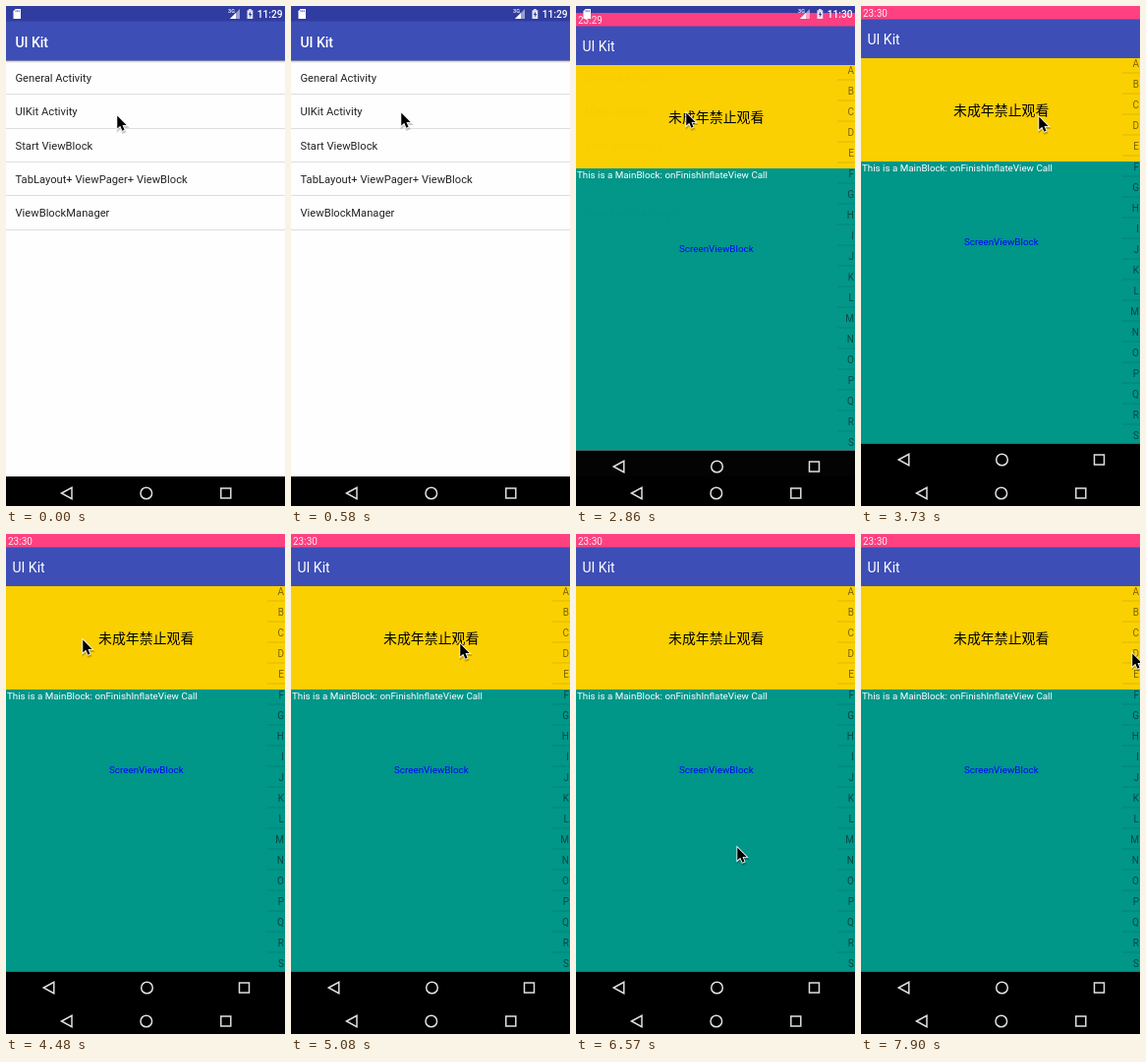
These frames come from a looping animation (284x508 px, 8 s). An HTML page:

```html
<!DOCTYPE html>
<html lang="en">
<head>
<meta charset="utf-8">
<title>UI Kit</title>
<style>
  html, body { margin: 0; width: 100%; height: 100%; overflow: hidden; background: #000; }
  svg { display: block; width: 284px; height: 508px; font-family: Roboto, sans-serif; }
  .cjk { font-family: "Noto Sans CJK SC", "Noto Sans CJK", sans-serif; }
</style>
</head>
<body>
<svg id="stage" viewBox="0 0 284 508">
  <defs>
    <linearGradient id="shade" x2="0" y2="1">
      <stop stop-color="#000" stop-opacity=".28"/>
      <stop offset="1" stop-color="#000" stop-opacity="0"/>
    </linearGradient>
  </defs>

  <g id="list">
    <rect width="284" height="478" fill="#fefefe"/>
    <rect width="284" height="16" fill="#303c9f"/>
    <rect y="15.5" width="284" height="40" fill="#3d4eb6"/>
    <rect y="55" width="284" height="3" fill="url(#shade)"/>
    <text x="9.4" y="41.7" font-size="14" font-weight="500" fill="#fff">UI Kit</text>
    <circle id="ripple" cx="117" cy="108" r="11" fill="#000" opacity=".06"/>
    <g id="rows" font-size="11.2" fill="#222"></g>
  </g>

  <g id="main">
    <rect width="284" height="14" fill="#ff4081"/>
    <text id="innerClock" x="2" y="10.7" font-size="10" fill="#fff" fill-opacity=".9"></text>
    <rect y="13.5" width="284" height="39.5" fill="#3d4eb6"/>
    <text x="6.5" y="38.8" font-size="14" fill="#fff">UI Kit</text>
    <rect y="53" width="284" height="105" fill="#fbd000"/>
    <rect y="158" width="284" height="286.5" fill="#009688"/>
    <text class="cjk" x="142.7" y="110.7" font-size="13.9" text-anchor="middle">未成年禁止观看</text>
    <text x="1" y="168.2" font-size="9.8" fill="#fff">This is a MainBlock: onFinishInflateView Call</text>
    <text x="142.8" y="242.8" font-size="9.85" text-anchor="middle" fill="#00f">ScreenViewBlock</text>
    <g id="index" font-size="10" text-anchor="end"></g>
    <rect y="444.5" width="284" height="41" fill="#000"/>
    <g id="innerNav"></g>
  </g>

  <g id="status" fill="#fff">
    <path d="M9.6 3H15V13H7.5V5.2Z"/>
    <path d="M10 4.2v2M11.7 4.2v2M13.3 4.2v2" stroke="#303c9f" stroke-width=".7"/>
    <text x="226" y="7.2" font-size="5.5" font-weight="500">3G</text>
    <path d="M238 3V13H228Z" opacity=".5"/>
    <path d="M234 7V13H228Z"/>
    <path d="M247.2 3h2.4v1.2h1.7V13h-5.8V4.2h1.7Z" opacity=".85"/>
    <path d="M248.9 5.4l-2 3.6h1.3v2.6l2-3.7h-1.3Z" fill="#303c9f"/>
    <text id="clock" x="281.5" y="12" font-size="10.2" font-weight="500" text-anchor="end"></text>
  </g>

  <rect y="478" width="284" height="30"/>
  <g id="outerNav"></g>

  <g id="cursor">
    <g transform="translate(.8 1) scale(.92)">
      <path d="M.5 1V16l3.4-3 2.4 5.4 2.6-1.1-2.3-5.2h4.7Z" opacity=".2" stroke="#000" stroke-width="2" transform="translate(.4 1)"/>
      <path d="M.5 .5V14.8l3.3-3 2.3 5.2 2.3-1-2.2-5.1h4.5Z" stroke="#fff" stroke-width="1.8" paint-order="stroke"/>
    </g>
  </g>
</svg>
<script>
const LOOP = 8000;
const TICK = 148;        // the picture refreshes in steps
const CLOCK_TURN = 2710;
const OPEN = CLOCK_TURN + TICK;
const SLIDE = 300;
const $ = id => document.getElementById(id);
const show = (id, visible) => { $(id).style.display = visible ? '' : 'none'; };

function fillRows() {
  const labels = ['General Activity', 'UIKit Activity', 'Start ViewBlock',
    'TabLayout+ ViewPager+ ViewBlock', 'ViewBlockManager'];
  $('rows').innerHTML = labels.map((label, i) => {
    const y = i * 34.4;
    return `<text x="9.5" y="${Math.round(76.7 + y)}">${label}</text>
      <rect y="${Math.round(89.2 + y)}" width="284" height="1" fill="#dedede"/>`;
  }).join('');
}

function fillIndex() {
  $('index').innerHTML = [...'ABCDEFGHIJKLMNOPQRS'].map((letter, i) => {
    const y = i * 21;
    return `<text x="283" y="${62.2 + y}" fill-opacity=".52">${letter}</text>
      <rect x="266" y="${67.5 + y}" width="18" height="1" fill-opacity=".12"/>`;
  }).join('');
}

function fillNav(id, y, homeX, gapLeft, gapRight) {
  $(id).innerHTML = `<g fill="none" stroke="#e0e0e0" stroke-width="1.5"
    transform="translate(${homeX} ${y})">
    <path d="M${-gapLeft - 5.5} 0l10.5-5.7v11.4Z"/>
    <circle r="5.8"/>
    <rect x="${gapRight - 5}" y="-5" width="10" height="10"/></g>`;
}

// Turning points of the pointer: time, x, y
const path = [
  [0, 112, 110], [600, 111, 107], [3150, 111, 107], [3740, 180, 111], [3900, 180, 111],
  [4330, 2, 104], [4780, 271, 110], [5078, 171, 110], [5380, 2, 102], [5980, 235, 152],
  [6558, 163, 317], [6800, 151, 323], [7160, 162, 271], [7890, 275, 120]
];

function pointerAt(t) {
  const next = path.findIndex(key => key[0] > t);
  if (next < 0) return path.at(-1).slice(1);
  const [t0, x0, y0] = path[next - 1];
  const [t1, x1, y1] = path[next];
  const p = (t - t0) / (t1 - t0);
  const ease = p * p * (3 - 2 * p);
  return [x0 + (x1 - x0) * ease, y0 + (y1 - y0) * ease].map(Math.round);
}

function draw(time) {
  const ticks = Math.floor((time - CLOCK_TURN + 16) / TICK);
  const t = Math.max(0, CLOCK_TURN + ticks * TICK);
  const left = 1 - Math.min(1, Math.max(0, (t - OPEN) / SLIDE));

  show('ripple', time >= 2260 && time < 2410);
  $('clock').textContent = t < CLOCK_TURN ? '11:29' : '11:30';
  $('innerClock').textContent = left > 0 ? '23:29' : '23:30';
  show('status', left === 1);

  show('main', t >= OPEN);
  $('main').setAttribute('opacity', 1 - .015 * left);
  $('main').setAttribute('transform', `translate(0 ${Math.round(7 * left ** 3)})`);

  $('cursor').setAttribute('transform', `translate(${pointerAt(t)})`);
}

fillRows();
fillIndex();
fillNav('innerNav', 461, 143.5, 99.7, 99);
fillNav('outerNav', 495, 142.8, 80.8, 81);

const began = performance.now();
function tick() {
  draw((performance.now() - began) % LOOP);
  requestAnimationFrame(tick);
}
tick();
</script>
</body>
</html>
```
